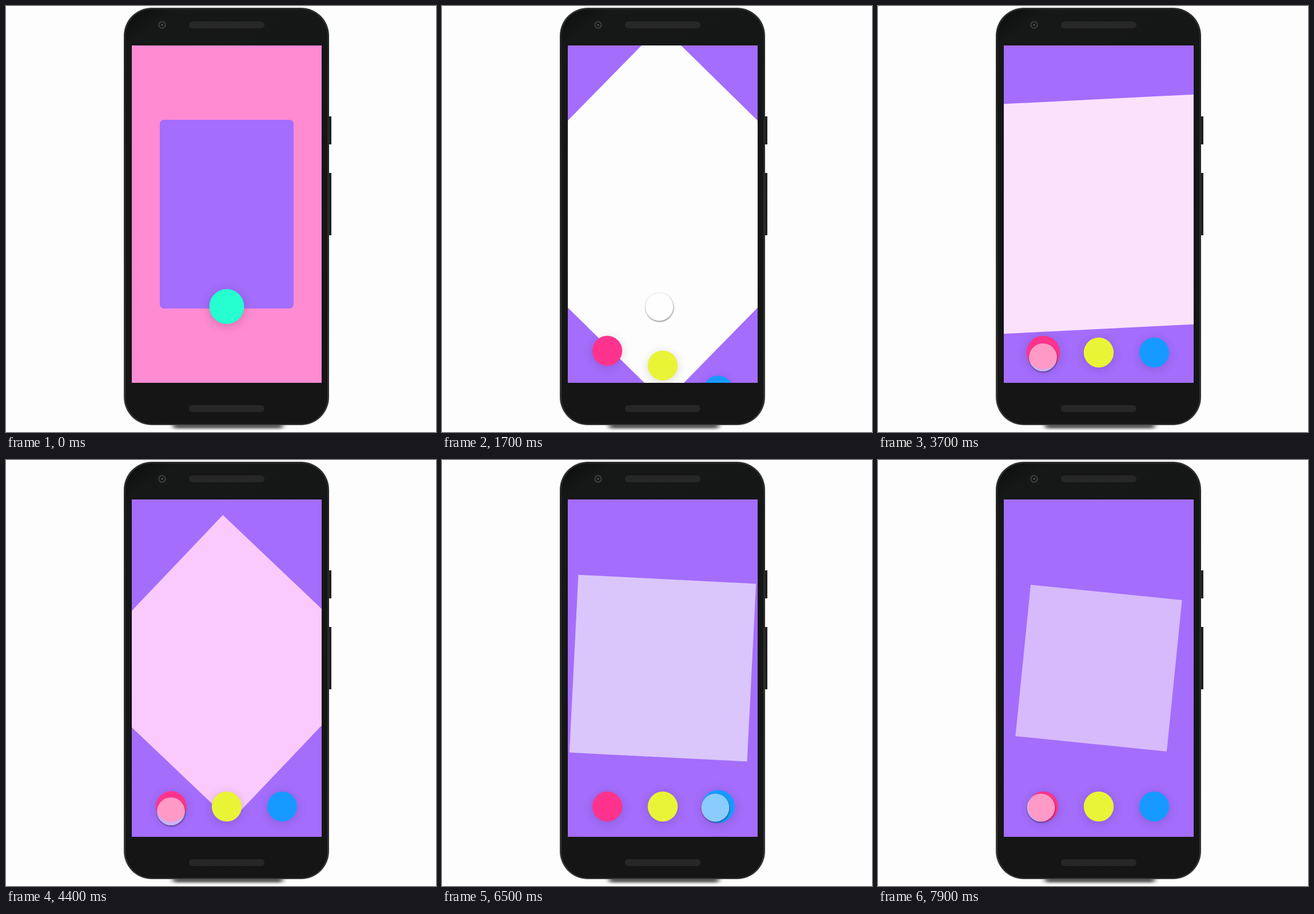
Write an HTML page that moves like this. It is 752x745 px and loops after 8000 ms.

```html
<!DOCTYPE html>
<html lang="en">
<head>
<meta charset="utf-8">
<title>Spinning square</title>
<style>
  html, body { margin: 0; width: 100%; height: 100%; overflow: hidden; background: #fdfdfe; }
  svg { display: block; width: 752px; height: 745px; }
</style>
</head>
<body>
<svg viewBox="0 0 752 745">
  <defs>
    <clipPath id="screen"><rect x="220" y="69" width="332" height="590"/></clipPath>
    <clipPath id="cardClip"><rect id="cardHole"/></clipPath>
    <linearGradient id="rim" x2="0" y2="1">
      <stop offset="0" stop-color="#303332"/>
      <stop offset=".1" stop-color="#222423"/>
      <stop offset="1" stop-color="#343535"/>
    </linearGradient>
    <linearGradient id="face" x2=".35" y2="1">
      <stop offset="0" stop-color="#0b0c0c"/>
      <stop offset=".08" stop-color="#161717"/>
      <stop offset="1" stop-color="#151515"/>
    </linearGradient>
    <pattern id="mesh" width="4" height="4" patternUnits="userSpaceOnUse">
      <rect width="4" height="4" fill="#292929"/>
      <path d="M0 0h1v1h-1zM2 2h1v1h-1z" fill="#191919"/>
    </pattern>
    <filter id="soft" x="-80%" y="-80%" width="260%" height="260%"><feGaussianBlur stdDeviation="9"/></filter>
    <filter id="tight" x="-30%" y="-30%" width="160%" height="160%"><feGaussianBlur stdDeviation=".8"/></filter>
    <filter id="ground" x="-20%" y="-150%" width="140%" height="400%"><feGaussianBlur stdDeviation="5 2"/></filter>
    <mask id="outside" maskUnits="userSpaceOnUse" x="-40" y="-40" width="80" height="80">
      <rect x="-40" y="-40" width="80" height="80" fill="#fff"/>
      <circle r="24.5" fill="#000"/>
    </mask>
  </defs>

  <rect x="292" y="730" width="192" height="9" rx="4" opacity=".65" filter="url(#ground)"/>
  <path d="M563 193h6v49h-6zM563 292h6v109h-6z" fill="#202121"/>
  <rect x="206" y="3" width="359" height="730" rx="49" fill="url(#rim)"/>
  <rect x="209" y="5.5" width="353" height="725.5" rx="46" fill="url(#face)"/>
  <rect x="320" y="27" width="132" height="12" rx="6" fill="url(#mesh)"/>
  <rect x="320" y="698" width="132" height="12" rx="6" fill="url(#mesh)"/>
  <circle cx="273" cy="33" r="6.8" fill="#3b3c3c"/>
  <circle cx="273" cy="33" r="4.5" fill="#171818"/>
  <circle cx="273" cy="33" r="1.5" fill="#606262"/>

  <g clip-path="url(#screen)">
    <rect x="220" y="69" width="332" height="590" fill="#ff8bd2"/>
    <rect id="card" fill="#a46dfc"/>
    <g clip-path="url(#cardClip)"><rect id="square"/></g>
    <g id="buttons"></g>
  </g>

  <g id="pointer">
    <circle cx=".5" cy="1.5" r="24.8" opacity=".4" mask="url(#outside)" filter="url(#tight)"/>
    <circle r="24.5" fill="#fff" fill-opacity=".5" stroke="#555" stroke-opacity=".12"/>
  </g>
</svg>
<script>
const LOOP = 8000, STEP = 100;
const CENTER = { x: 386, y: 364 };
const START = 1030;
const BUTTON_Y = 606;
const PULSE = 190;
const PINK_PRESSES = [[2850, 4520], [7535, LOOP]];
const BLUE_PRESSES = [[5290, 6575]];

// Pointer moves: begin, end, target x, target y
const moves = [
  [100, 850, 380, 526],
  [1900, 2650, 288.5, 614.5],
  [4600, 5200, 478, 608],
  [6650, 7400, 285, 608]
];

const $ = id => document.getElementById(id);
const clamp = v => Math.min(1, Math.max(0, v));
const lerp = (a, b, p) => a + (b - a) * p;
const progress = (t, from, to) => clamp((t - from) / (to - from));
const easeInOut = p => p * p * (3 - 2 * p);
const easeOut = p => 1 - (1 - p) ** 3;
const overshoot = p => 1 + 3 * (p - 1) ** 3 + 2 * (p - 1) ** 2;
const held = (t, spans) =>
  spans.reduce((sum, [a, b]) => sum + Math.min(b, Math.max(a, t)) - a, 0);

function set(node, attrs) {
  for (const name in attrs) node.setAttribute(name, attrs[name]);
  return node;
}

function addButton(color, r, shade) {
  const make = (name, attrs) => set(document.createElementNS('http://www.w3.org/2000/svg', name), attrs);
  const group = make('g', {});
  group.append(
    make('circle', { r, cy: 3, opacity: shade, filter: 'url(#soft)' }),
    make('circle', { r, fill: color })
  );
  $('buttons').append(group);
  return group;
}

const startButton = addButton('#26ffd0', 30.5, .2);
const choices = [
  { x: 289, color: '#ff338d', presses: PINK_PRESSES },
  { x: 386, color: '#eaf436', presses: [] },
  { x: 483, color: '#179aff', presses: BLUE_PRESSES }
].map(choice => ({ ...choice, node: addButton(choice.color, 26.2, .15) }));

const place = (node, x, y, scale = 1) =>
  set(node, { transform: `translate(${x} ${y}) scale(${scale})` });

function drawCard(t) {
  const p = easeOut(progress(t, START, 1450));
  const width = lerp(234, 332, p), height = lerp(330, 590, p);
  const box = {
    x: CENTER.x - width / 2, y: CENTER.y - height / 2,
    width, height, rx: lerp(7, 0, p)
  };
  set($('card'), box);
  set($('cardHole'), box);
  place(startButton, 386, 525.5, 1 - easeInOut(progress(t, 1000, 1300)));
}

function drawSquare(t) {
  const age = Math.max(0, t - START);
  const size = 487.6 - age * .03226;
  const pink = held(t, PINK_PRESSES), blue = held(t, BLUE_PRESSES);
  const color = [253 - pink * .0015 - blue * .027, 253 - pink * .033, 254 - pink * .0015].map(Math.round);
  set($('square'), {
    x: CENTER.x - size / 2, y: CENTER.y - size / 2, width: size, height: size,
    fill: `rgb(${color})`,
    opacity: progress(t, START, 1350),
    transform: `rotate(${age * .06634} ${CENTER.x} ${CENTER.y})`
  });
}

function drawChoices(t) {
  choices.forEach(({ x, node, presses }, i) => {
    const from = 1460 + i * 85;
    const y = BUTTON_Y + 120 * (1 - overshoot(progress(t, from, from + 680)));
    const press = presses.find(([a, b]) => t >= a && t < b);
    const pulse = press ? Math.sin(Math.PI * (t - press[0]) / PULSE) ** 2 : 0;
    place(node, x, y, 1 + pulse * .12);
  });
}

function drawPointer(t) {
  let x = 70, y = 293;
  for (const [from, to, endX, endY] of moves) {
    const p = easeInOut(progress(t, from, to));
    x = lerp(x, endX, p);
    y = lerp(y, endY, p);
  }
  place($('pointer'), x, y);
  set($('pointer'), { opacity: t < 100 ? 0 : 1 });
}

function draw(t) {
  drawCard(t);
  drawSquare(t);
  drawChoices(t);
  drawPointer(t);
}

const began = performance.now();
function tick() {
  const t = (performance.now() - began) % LOOP;
  draw(Math.floor(t / STEP) * STEP);
  requestAnimationFrame(tick);
}
tick();
</script>
</body>
</html>
```
